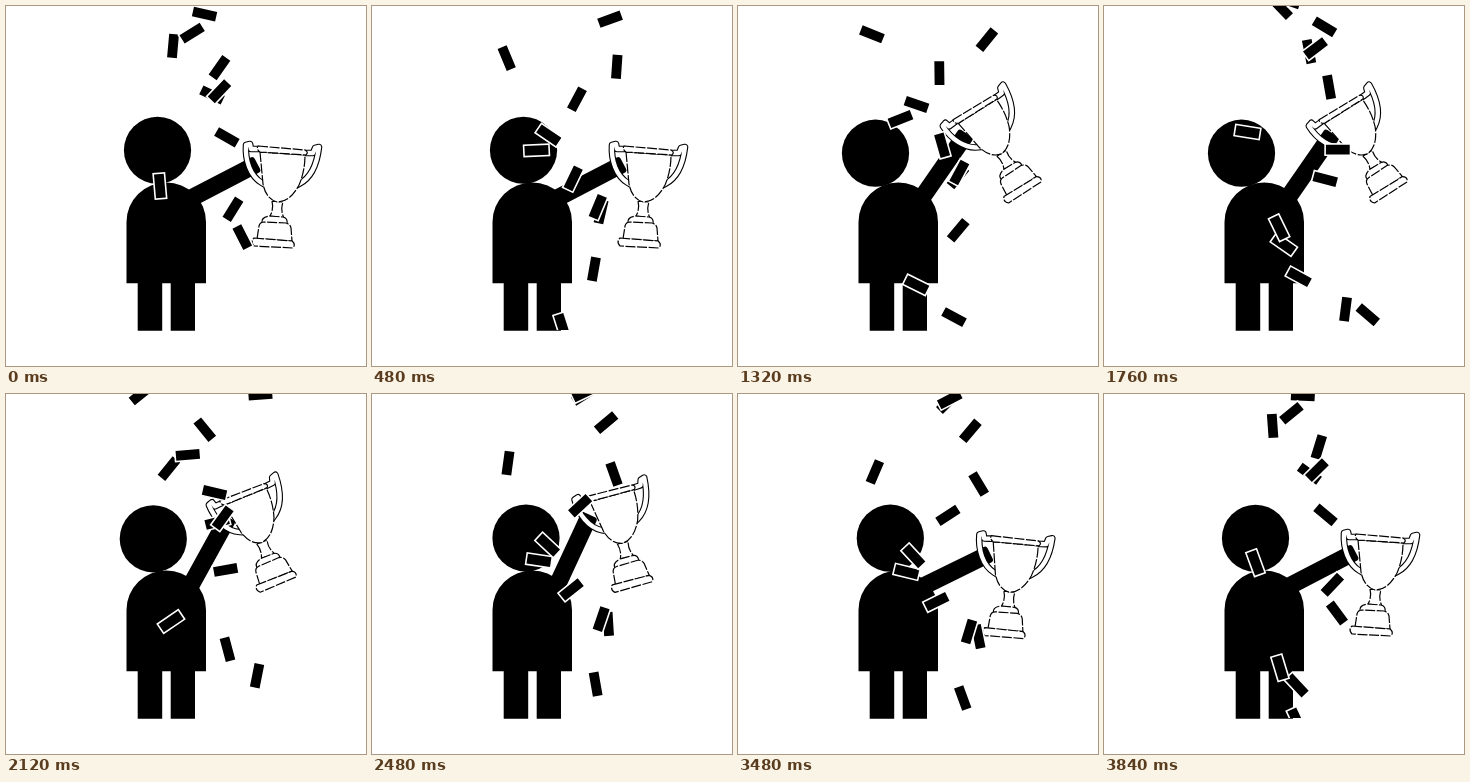
An HTML page for the animation above (3880 ms loop, 360 by 360 pixels).

```html
<!DOCTYPE html>
<html lang="en">
<head>
<meta charset="utf-8">
<title>Trophy celebration</title>
<style>
  html, body { margin: 0; width: 100%; height: 100%; overflow: hidden; background: #fff; }
  svg { display: block; width: 100vw; height: 100vh; }
  .line { fill: #fff; stroke: #000; stroke-width: 1.2; stroke-linejoin: round; stroke-dasharray: 10 1.6; }
  .band { fill: none; stroke-linejoin: round; }
  .outer { stroke: #000; stroke-width: 6.6; stroke-linecap: square; }
  .inner { stroke: #fff; stroke-width: 4.4; stroke-linecap: square; }
</style>
</head>
<body>
<svg viewBox="0 0 360 360">
  <defs>
    <clipPath id="floor"><rect width="360" height="324"/></clipPath>
    <g id="handles">
      <path d="M250 143L245 143L244 138L240 139C239 154 244 170 256 177"/>
      <path d="M302 147L307 147L309 142L313 141C311 158 305 172 293 178"/>
    </g>
  </defs>
  <rect width="360" height="360" fill="#fff"/>
  <rect id="arm" x="-8" y="-8.7" width="80" height="17.4" rx="3"/>
  <path d="M120.5 277.3V216A39.7 39.5 0 0 1 200 216V277.3H189V324.7H164.7V277.3H156.2V324.7H131.7V277.3Z"/>
  <circle id="head" r="33.6"/>
  <g id="trophy">
    <use href="#handles" class="band outer"/>
    <use href="#handles" class="band inner"/>
    <path class="line" d="M266 195Q268 203 264 210L278 212Q274 204 277 196Z"/>
    <path class="line" d="M256 217Q255 211 264 210L277 211Q282 212 281 218Z"/>
    <path class="line" d="M251 233L253 220Q254 216 258 216L280 217Q284 218 285 222L286 235Z"/>
    <path class="line" d="M248 232L286 235Q290 238 287 242L248 240Q244 236 248 232Z"/>
    <path class="line" d="M254 146L257 178Q260 193 271 196Q284 196 293 179Q299 165 299 149Z"/>
    <path class="line" d="M252 140L299 144Q303 146 300 149L254 146Q250 143 252 140Z"/>
  </g>
  <g id="confetti" clip-path="url(#floor)" stroke="#fff" stroke-width="1.6"></g>
</svg>
<script>
const LOOP = 3880, STEP = 40, CYCLE = 24, GRAVITY = 0.12;
const byId = id => document.getElementById(id);
const arm = byId('arm'), head = byId('head'), trophy = byId('trophy'), confetti = byId('confetti');

// Motion of each strip, in steps since it enters at the top:
// entry step, fall speed, x, drift, bend, angle, spin, brake
const strips = [
  [-0.3, 6.1, 199, -0.45, 0.076, 0, 9.6],
  [19.7, 6.9, 178, -2.67, 0.113, 43, 10.6, -0.145],
  [21.4, 7.1, 191, -1.47, 0.034, -60, 8.2, -0.12],
  [17.1, 6.85, 225, -1.6, 0.018, -28, 21, -0.205],
  [13.8, 6.6, 212, -1.85, 0.118, 150, -12, 0.08],
  [14.2, 6.6, 212, -0.35, 0.045, -26, -1.9],
  [10.2, 7.1, 242, -2.3, 0.059, 178, -10],
  [4.9, 7.7, 254.5, -1.37, 0, 177, -11.7],
  [5, 6.6, 135, -0.575, 0.076, -39, 15.2]
];

const quad = (s, a, b, c = 0) => a + b * s + c * s * s;

function ease(t, from, to) {
  const s = Math.min(1, Math.max(0, (t - from) / (to - from)));
  return s * s * (3 - 2 * s);
}

function addStrip() {
  const el = document.createElementNS('http://www.w3.org/2000/svg', 'rect');
  const box = { x: -12.7, y: -5.7, width: 25.4, height: 11.4 };
  for (const k in box) el.setAttribute(k, box[k]);
  confetti.append(el);
  return el;
}

// a strip may still be falling while its next copy enters
const pieces = strips.flatMap(rule =>
  [-1, 0, 1].map(turn => ({ el: addStrip(), rule, shift: turn * CYCLE })));

function drawPerson(t) {
  const lift = ease(t, 600, 1250);
  const sway = ease(t, 1760, 2400);
  const drop = ease(t, 2480, 2880);
  const rest = ease(t, 2880, 3560);

  const x = 151.5 - 14 * lift + 16.5 * sway + 19 * drop - 21.5 * rest;
  const swing = -33 * lift - 4 * sway + 76 * drop - 39 * rest;
  const tilt = -3 * lift + 21 * sway - 18 * drop;
  const reach = 84 + 4 * lift - 10 * sway + 7 * drop - rest;

  head.setAttribute('cx', x);
  head.setAttribute('cy', 144 + (x - 157) ** 2 / 120);
  arm.setAttribute('transform',
    `translate(187.5 ${191 + swing * 0.13}) rotate(${swing * 0.87 - tilt * 0.3 - 27.5})`);
  trophy.setAttribute('transform',
    `translate(188 192) rotate(${swing}) translate(${reach} -1) rotate(${tilt}) translate(-272 -191)`);
}

function drawConfetti(phase) {
  for (const { el, rule, shift } of pieces) {
    const [entry, speed, x, drift, bend, angle, spin, brake] = rule;
    const s = phase + shift - entry;
    const y = quad(s, 0, speed, GRAVITY);
    const on = s > -2 && y < 340;
    el.setAttribute('visibility', on ? 'visible' : 'hidden');
    if (on) el.setAttribute('transform',
      `translate(${quad(s, x, drift, bend)} ${y}) rotate(${quad(s, angle, spin, brake)})`);
  }
}

function draw(ms) {
  const n = Math.floor(ms % LOOP / STEP);
  drawPerson(n * STEP);
  drawConfetti((Math.max(n, 1) - 1) % CYCLE + 1);
}

const start = performance.now();
function tick() {
  draw(performance.now() - start);
  requestAnimationFrame(tick);
}
tick();
</script>
</body>
</html>
```
